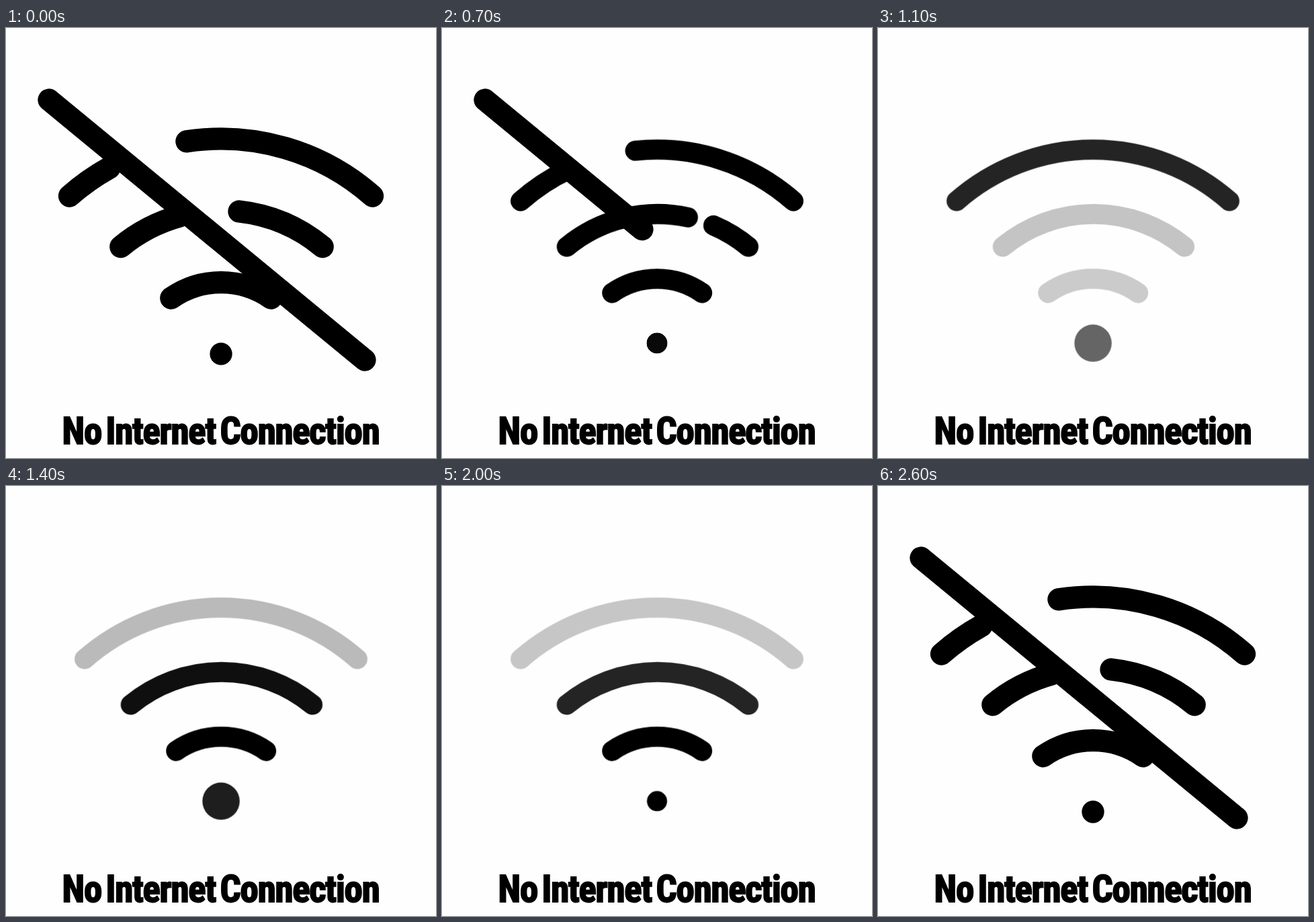
Recreate the animation shown at these times as an HTML page. Size 640x640 px, loop 3000 ms.

```html
<!DOCTYPE html>
<html lang="en">
<head>
<meta charset="utf-8">
<title>No Internet Connection</title>
<style>
  html, body { margin: 0; width: 100%; height: 100%; overflow: hidden; background: #fefefe; }
  svg { display: block; width: 100vw; height: 100vh; }

  .line { fill: none; stroke: #000; stroke-width: 33.33; stroke-linecap: round; }
  .icon, .line, .dot {
    animation: 3s cubic-bezier(.333, 0, .667, 1) infinite;
  }
  .icon  { transform-origin: 320px 325px; animation-name: shrink; }
  .dot   { transform-origin: 320px 485px; animation-name: swell, dot-fade; }
  .inner { animation-name: inner-fade; }
  .mid   { animation-name: mid-fade, mid-gap; }
  .outer { animation-name: outer-fade, outer-gap; }
  .slash { animation-name: slash; }

  @keyframes shrink {
    0%, 11.1%    { transform: scale(1); }
    21.8%, 75.5% { transform: scale(.9); }
    86.2%, 100%  { transform: scale(1); }
  }
  @keyframes slash {
    0%, 17.8%   { stroke-dasharray: 1 2; visibility: visible; }
    28.9%, 75%  { stroke-dasharray: 0 2; visibility: hidden; }
    86.2%, 100% { stroke-dasharray: 1 2; visibility: visible; }
  }

  /* The gaps slide along the arcs and off their right ends. */
  @keyframes mid-gap {
    0%, 17.8%   { stroke-dasharray: .307 .273 .42 2; }
    28.9%, 75%  { stroke-dasharray: 1 0 0 2; }
    86.2%, 100% { stroke-dasharray: .307 .273 .42 2; }
  }
  @keyframes outer-gap {
    0%, 22%     { stroke-dasharray: .148 .248 .604 2; }
    32%, 74%    { stroke-dasharray: 1 0 0 2; }
    85%, 100%   { stroke-dasharray: .148 .248 .604 2; }
  }

  /* Two signal pulses travelling outwards. */
  @keyframes swell {
    0%, 22.2%    { transform: scale(1); }
    32%, 54.3%   { transform: scale(1.85); }
    64.5%, 100%  { transform: scale(1); }
  }
  @keyframes dot-fade {
    0%, 22.2%, 41.5%, 44.2%, 64.6%, 100% { opacity: 1; }
    31.8%, 54.6% { opacity: .2; }
  }
  @keyframes inner-fade {
    0%, 25.6%, 46.4%, 46.8%, 66.6%, 100% { opacity: 1; }
    36.4%, 56.7% { opacity: .2; }
  }
  @keyframes mid-fade {
    0%, 27.4%, 48.4%, 69.5%, 100% { opacity: 1; }
    37.9%, 59% { opacity: .2; }
  }
  @keyframes outer-fade {
    0%, 33.8%, 55.2%, 76.3%, 100% { opacity: 1; }
    44.8%, 65.7% { opacity: .2; }
  }

  text {
    font-family: Impact, "Roboto Condensed", "Open Sans Condensed", "Liberation Sans Narrow", "Noto Sans", sans-serif;
    font-weight: 900;
    font-stretch: 62.5%;
    font-size: 55px;
    letter-spacing: -.022em;
    word-spacing: -.09em;
    text-anchor: middle;
    stroke: #000;
    stroke-width: 1.8;
  }
</style>
</head>
<body>
<svg viewBox="0 0 640 640">
  <g class="icon">
    <path class="line outer" pathLength="1" d="M94.5 250A341.6 341.6 0 0 1 545.5 250"/>
    <path class="line mid" pathLength="1" d="M170.8 325.6A235.9 235.9 0 0 1 471.2 325.6"/>
    <path class="line inner" d="M245.8 402A130 130 0 0 1 394.6 402"/>
    <circle class="dot" cx="320" cy="485" r="16.67"/>
  </g>
  <path class="line slash" pathLength="1" d="M64 107L534 494"/>
  <text x="319.5" y="619">No Internet Connection</text>
</svg>
<script>
  // Choose the largest type size that fits the caption line.
  const label = document.querySelector('text');
  const size = Math.min(55, 55 * 472 / label.getComputedTextLength());
  label.style.fontSize = size + 'px';
  label.setAttribute('y', 599.5 + size * .36);
</script>
</body>
</html>
```
